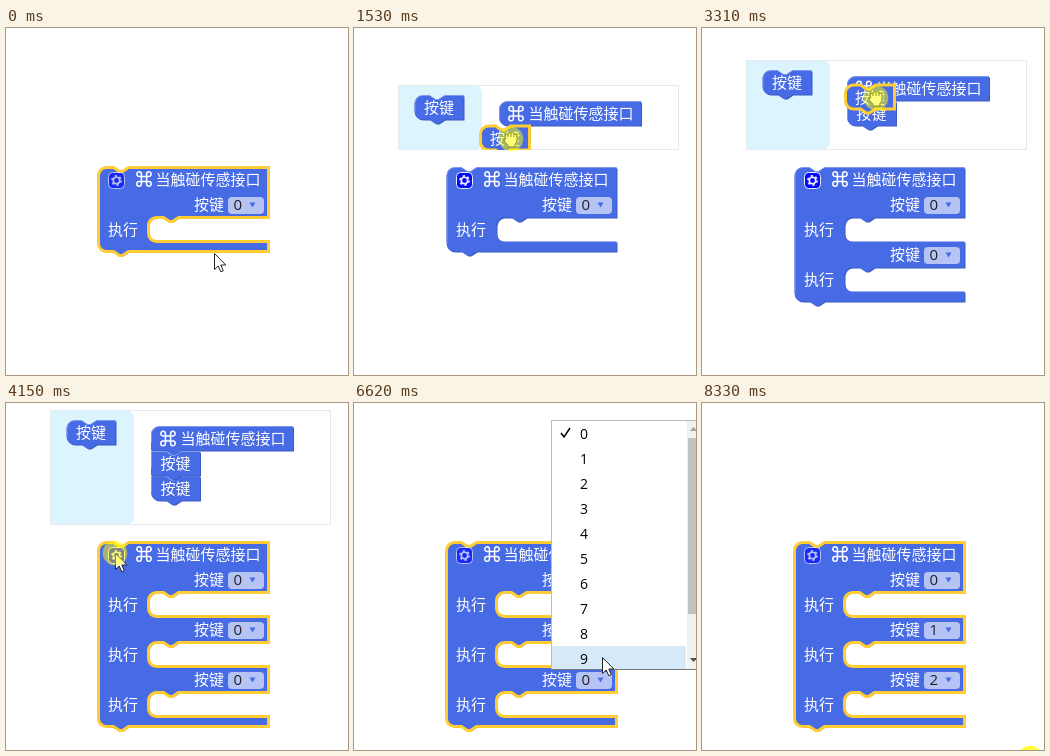
Recreate the animation shown at these times as an HTML page. Size 342x347 px, loop 8410 ms.

```html
<!DOCTYPE html>
<html lang="zh">
<head>
<meta charset="utf-8">
<style>
html, body { margin: 0; width: 100%; height: 100%; overflow: hidden; background: #fff; }
svg { display: block; }
text { font: 15px "Noto Sans CJK SC", "Noto Sans CJK", "Noto Sans", sans-serif; fill: #fff; }
.value { font-family: "Open Sans", "Noto Sans", sans-serif; fill: #222; }
.option { font: 14px "Open Sans", "Noto Sans", sans-serif; fill: #000; }
</style>
</head>
<body>
<svg id="stage" width="342" height="347" viewBox="0 0 342 347">
  <defs><clipPath id="bubble"><rect id="bubbleClip" x="44" y="7" width="281" height="115"/></clipPath></defs>
  <g id="scene"></g>
</svg>
<script>
const LOOP = 8410, STEP = 77;
const BLUE = '#466be5', LIGHT = '#7f99ee', DARK = '#3a5ac2', YELLOW = '#fc3';
const scene = document.getElementById('scene');
const bubbleClip = document.getElementById('bubbleClip');

// Pointer path: time, x, y
const PATH = [
  [0, 208, 225], [60, 208, 225], [300, 170, 200], [600, 110, 152], [985, 110, 152],
  [1220, 91, 80.5], [1290, 91, 80.5], [1530, 157, 111], [1690, 175, 112], [1835, 175, 112],
  [2370, 115, 65], [2560, 91, 55.5], [2680, 91, 55.5], [3300, 174, 70], [3530, 174, 70],
  [3845, 109, 150], [4250, 109, 150], [4835, 240, 224], [5140, 240, 224], [5457, 246, 262],
  [5600, 246, 274], [6465, 246, 274], [6540, 247, 283], [6612, 248, 254], [7075, 242, 82],
  [7225, 242, 82], [7610, 345, 292], [8290, 345, 292], [8300, 328, 355]
];
const PRESSES = [
  [610, 755], [1220, 1830], [2600, 3530], [3990, 4200], [4910, 4990],
  [5620, 5760], [6060, 6200], [7225, 7380], [8300, LOOP]
];
const DROPS = [1835, 3400];
const BUBBLE = [680, 4200];
const MENUS = [{ open: 4990, close: 5680, top: 235 }, { open: 6140, close: 7300, top: 17 }];

const within = (t, [a, b]) => t >= a && t < b;

function pointerAt(t) {
  let i = 1;
  while (i < PATH.length - 1 && PATH[i][0] < t) i++;
  const [t0, x0, y0] = PATH[i - 1], [t1, x1, y1] = PATH[i];
  const k = Math.min(1, (t - t0) / (t1 - t0));
  return { x: x0 + (x1 - x0) * k, y: y0 + (y1 - y0) * k };
}

const text = (x, y, s, cls = '') => `<text class="${cls}" x="${x}" y="${y}">${s}</text>`;
const at = (x, y, body) => `<g transform="translate(${x} ${y})">${body}</g>`;

// Block outline; each mouth is the y of a statement input
function block({ w, h, notch = true, squareTop, squareBottom, mouths = [], selected }) {
  const corner = squareTop ? 'V0' : 'V8A8 8 0 0 1 8 0';
  const top = `${corner}${notch ? 'H15l6 4h3l6-4' : ''}H${w}`;
  const inner = mouths.map(y =>
    `V${y}H80l-6 4h-3l-6-4h-7a8 8 0 0 0-8 8v8a8 8 0 0 0 8 8H${w}`).join('');
  const d = `M0 ${h - 8}${top}${inner}V${h}H30l-6 4h-3l-6-4${squareBottom ? 'H0' : 'H8a8 8 0 0 1-8-8'}z`;
  const edge = selected
    ? `<path d="${d}" fill="none" stroke="${YELLOW}" stroke-width="3"/>`
    : `<path d="M.5 ${h - 8}${top}" fill="none" stroke="${LIGHT}"/>`;
  return `<path d="${d}" fill="${DARK}" transform="translate(1 1)"/><path d="${d}" fill="${BLUE}"/>${edge}`;
}

const command = (x, y) => at(x, y, `<path fill="none" stroke="#fff" stroke-width="1.5"
  d="M-2.6-4.9V4.9a2.3 2.3 0 1 1-2.3-2.3H4.9a2.3 2.3 0 1 1-2.3 2.3V-4.9a2.3 2.3 0 1 1 2.3 2.3H-4.9a2.3 2.3 0 1 1 2.3-2.3z"/>`);

const gear = opacity => at(110.5, 152.5, `<g opacity="${opacity}">
  <rect x="-8" y="-8" width="16" height="16" rx="4" fill="#00f" stroke="#fff"/>
  <circle r="3.2" fill="none" stroke="#fff" stroke-width="1.6"/>
  <circle r="4.6" fill="none" stroke="#fff" stroke-width="1.6" stroke-dasharray="2.3 2.517"/></g>`);

const field = (y, value) => `<rect x="222" y="${y - 8}" width="36" height="17" rx="4" fill="#fff" opacity=".6"/>
  ${text(227.5, y + 5, value, 'value')}<path d="M243.5 ${y - 2.5}h6l-3 5z" fill="${BLUE}"/>`;

function mainBlock(t, rows) {
  const mouths = Array.from({ length: rows }, (_, i) => 50 + 50 * i);
  const values = [0, t >= MENUS[0].close ? 1 : 0, t >= MENUS[1].close ? 2 : 0];
  const selected = !within(t, [1220, 3990]);
  return at(92.5, 139.5, block({ w: 170, h: 34 + 50 * rows, mouths, selected })) +
    gear(within(t, BUBBLE) ? .9 : .6) + command(138, 151) + text(149.5, 157, '当触碰传感接口') +
    mouths.map((_, i) => {
      const y = 177 + 50 * i;
      return text(188, y + 5, '按键') + field(y, values[i]) + text(102, y + 30, '执行');
    }).join('');
}

const item = (x, y, opts) => at(x, y, block({ w: 49, h: 24, ...opts }) + text(9.5, 17.5, '按键'));

function mutator(t, rows, pointer) {
  const top = 82 - 25 * rows, count = rows - 1;
  const dragging = within(t, [1250, DROPS[0]]) || within(t, [2680, DROPS[1]]);
  const selected = !dragging && t < 3990;
  bubbleClip.setAttribute('y', top);
  bubbleClip.setAttribute('height', 122 - top);
  let out = `<rect x="44" y="${top}" width="281" height="${122 - top}" fill="#fff"/>
    <path d="M44 ${top}h76a8 8 0 0 1 8 8V114a8 8 0 0 1-8 8H44z" fill="#dcf4fe"/>
    <rect x="44.5" y="${top + .5}" width="280" height="${121 - top}" fill="none" stroke="#e4ebee"/>`;
  out += item(60.5, top + 10.5, { selected: within(t, [1220, 1250]) || within(t, [2600, 2680]) });
  out += at(145, top + 16.5, block({ w: 142, h: 24, notch: false, squareBottom: count > 0 }) +
    command(17, 12) + text(29.5, 17.5, '当触碰传感接口'));
  for (let i = count - 1; i >= 0; i--) {
    out += item(145, top + 41.5 + 25 * i,
      { squareTop: true, squareBottom: i < count - 1, selected: selected && i === 0 });
  }
  if (dragging) out += item(pointer.x - 30.5, pointer.y - 13, { selected: true });
  return `<g clip-path="url(#bubble)">${out}</g>`;
}

function menu({ top }, pointer) {
  const hover = Math.floor((pointer.y - top - 1) / 25);
  let out = `<rect x="197.5" y="${top + .5}" width="150" height="249" fill="#fff" stroke="#bbb"/>`;
  for (let i = 0; i < 10; i++) {
    const y = top + 1 + 25 * i;
    if (i === hover) {
      out += `<rect x="198" y="${y}" width="134" height="${Math.min(25, 248 - 25 * i)}" fill="#d6e9f8"/>`;
    }
    out += text(226, y + 18, i, 'option');
  }
  return out + `<path d="M207 ${top + 13}l3 4 6-9" fill="none" stroke="#000" stroke-width="1.5"/>
    <rect x="333" y="${top + 1}" width="14" height="248" fill="#f1f1f1"/>
    <rect x="334" y="${top + 18}" width="12" height="176" fill="#c1c1c1"/>
    <path d="M336 ${top + 11}h7l-3.5-4z" fill="#a3a3a3"/>
    <path d="M336 ${top + 238}h7l-3.5 4z" fill="#505050"/>
    <path d="M197 ${top + 249.5}h150" stroke="#777"/>`;
}

function cursor(t, { x, y }) {
  const hand = within(t, [1200, DROPS[0]]) || within(t, [2540, DROPS[1]]);
  const shape = hand
    ? 'M-6-2q0-3 3-3 1-2 3-1 2-1 3 1 3-1 3 2v4q0 3-2 4v3h-7v-2q-4-3-4-5 0-2 2-1zM-3-5v3M0-6v4M3-5v3'
    : 'M.5.5V16.5l3.7-3.5 2.6 5.8 2.5-1.1-2.5-5.7h5z';
  const ring = PRESSES.some(p => within(t, p))
    ? `<circle cx="${x}" cy="${y}" r="12.3" fill="#ff0" opacity="${t > 8000 ? .8 : .5}"/>` : '';
  return at(x, y, `<path d="${shape}" fill="#fff" stroke="#222"/>`) + ring;
}

function draw(t) {
  const pointer = pointerAt(t);
  const rows = 1 + DROPS.filter(d => t >= d).length;
  const openMenu = MENUS.find(m => within(t, [m.open, m.close]));
  scene.innerHTML = mainBlock(t, rows) +
    (within(t, BUBBLE) ? mutator(t, rows, pointer) : '') +
    (openMenu ? menu(openMenu, pointer) : '') + cursor(t, pointer);
}

let shown = -1;
function tick() {
  const step = Math.min(108, Math.floor((performance.now() % LOOP + 10) / STEP));
  if (step !== shown) {
    shown = step;
    draw(Math.max(0, step * STEP - 10));
  }
  requestAnimationFrame(tick);
}
tick();
</script>
</body>
</html>
```
